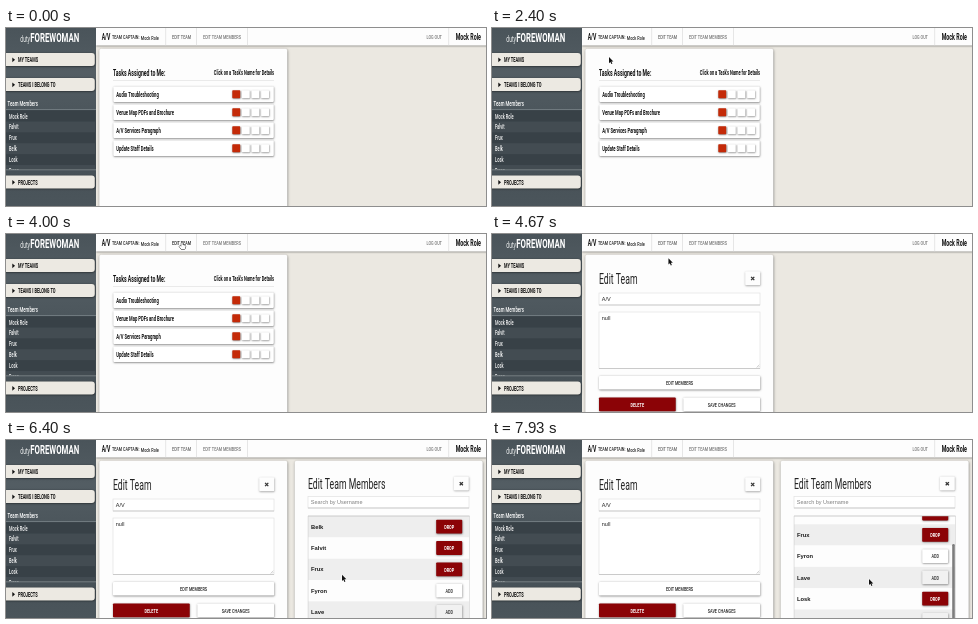
Write an HTML page with a canvas that moves like this. It is 480x178 px and loops after 8000 ms.

```html
<!DOCTYPE html>
<html lang="en">
<head>
<meta charset="utf-8">
<title>Team task board</title>
<style>
  html, body { margin: 0; width: 100%; height: 100%; overflow: hidden; background: #ebe8e1; }
  canvas { display: block; width: 480px; height: 178px; }
</style>
</head>
<body>
<canvas id="stage"></canvas>
<script>
const LOOP = 8000, W = 480, H = 178;
const CONDENSED = 0.62; // one factor for the narrow typeface
const RED = '#8b0306';
const USER = 'Mock Role';

const canvas = document.getElementById('stage');
const ctx = canvas.getContext('2d');
const ratio = Math.max(1, window.devicePixelRatio || 1);
canvas.width = W * ratio;
canvas.height = H * ratio;

function rect(x, y, w, h, color) {
  ctx.fillStyle = color;
  ctx.fillRect(x, y, w, h);
}

function vertical(y0, y1, ...colors) {
  const g = ctx.createLinearGradient(0, y0, 0, y1);
  colors.forEach((c, i) => g.addColorStop(i / (colors.length - 1), c));
  return g;
}

function raised(x, y, w, h, color = '#fff', radius = 1, blur = 2, shade = 0.5) {
  ctx.save();
  ctx.shadowColor = `rgba(0,0,0,${shade})`;
  ctx.shadowBlur = blur * ratio;
  ctx.shadowOffsetX = 0.3 * ratio;
  ctx.shadowOffsetY = 0.6 * ratio;
  ctx.fillStyle = color;
  ctx.beginPath();
  ctx.roundRect(x, y, w, h, radius);
  ctx.fill();
  ctx.restore();
}

// Form field: faint frame with a firmer lower edge.
function field(x, y, w, h) {
  rect(x, y, w, h, '#fff');
  ctx.strokeStyle = '#dedede';
  ctx.lineWidth = 0.6;
  ctx.strokeRect(x, y, w, h);
  rect(x, y + h - 0.4, w, 0.8, '#c2c2c2');
}

// Text is placed by the middle of its capitals.
function narrow(text, x, y, size, color = '#222', weight = 500, align = 'left') {
  ctx.save();
  ctx.translate(x, y + size * 0.36);
  ctx.scale(CONDENSED, 1);
  ctx.font = `${weight} ${size}px Roboto, sans-serif`;
  ctx.textAlign = align;
  ctx.fillStyle = color;
  ctx.fillText(text, 0, 0);
  ctx.restore();
}

function plain(text, x, y, size, color = '#222', weight = 400) {
  ctx.font = `${weight} ${size}px "Liberation Sans", Arial, sans-serif`;
  ctx.textAlign = 'left';
  ctx.fillStyle = color;
  ctx.fillText(text, x, y + size * 0.36);
}

function clipped(x, y, w, h, draw) {
  ctx.save();
  ctx.beginPath();
  ctx.rect(x, y, w, h);
  ctx.clip();
  draw();
  ctx.restore();
}

function button(label, x, y, w, h, color = '#fff', hover = false) {
  const red = color === RED;
  raised(x, y, w, h, color, 0.8, 2, hover ? 0.8 : 0.5);
  narrow(label, x + w / 2, y + h / 2, 6.2, red ? '#fff' : '#222', red ? 700 : 500, 'center');
}

function closeButton(x, y) {
  raised(x, y, 15, 14, '#fdfdfd', 1, 2, 0.4);
  const cx = x + 7.5, cy = y + 7.2, r = 1.6;
  ctx.strokeStyle = '#333';
  ctx.lineWidth = 1.3;
  ctx.beginPath();
  ctx.moveTo(cx - r, cy - r); ctx.lineTo(cx + r, cy + r);
  ctx.moveTo(cx + r, cy - r); ctx.lineTo(cx - r, cy + r);
  ctx.stroke();
}

function sidebarTab(label, y) {
  raised(-3, y, 91.8, 13, '#ece9e2', 3, 2, 0.6);
  ctx.fillStyle = '#111';
  ctx.beginPath();
  ctx.moveTo(6.3, y + 4.4); ctx.lineTo(9, y + 6.8); ctx.lineTo(6.3, y + 9.2);
  ctx.fill();
  narrow(label, 12, y + 6.9, 6.4, '#111', 600);
}

function sidebar() {
  rect(0, 0, 90, H, vertical(0, H, '#4a545a', '#535d63', '#4b555b', '#465056', '#4b555b'));
  narrow('duty', 24, 11, 8.2, '#eceeee', 400, 'right');
  narrow('FOREWOMAN', 24.3, 9.6, 12.6, '#fff', 600);
  sidebarTab('MY TEAMS', 25);
  sidebarTab('TEAMS I BELONG TO', 50);
  narrow('Team Members', 1.5, 75.3, 7, '#fff');
  rect(0, 81.4, 90, 0.7, '#879095');
  clipped(0, 82, 90, 59.5, () => {
    rect(0, 82, 90, 60, '#3d464c');
    [USER, 'Falvit', 'Frux', 'Belk', 'Losk', 'Fyron'].forEach((name, i) => {
      const y = 88.2 + i * 10.85;
      rect(0, y - 5.4, 89, 10.85, i % 2 ? '#434c52' : '#384147');
      narrow(name, 3, y, 6.4, '#f6f6f6');
    });
  });
  rect(0, 141.5, 90, 0.7, '#8a9194');
  sidebarTab('PROJECTS', 147.5);
}

function topBar(hoverEdit) {
  raised(90, -3, 393, 20.6, '#fdfdfd', 0, 2, 0.5);
  narrow('A/V', 95.7, 9, 8.2, '#111', 700);
  narrow('TEAM CAPTAIN:', 106, 9.3, 6, '#222');
  narrow(USER, 134.8, 9.3, 6.2, '#222');
  narrow('EDIT TEAM', 166, 9, 6.1, hoverEdit ? '#222' : '#666');
  narrow('EDIT TEAM MEMBERS', 197, 9, 6.1, '#777');
  narrow('LOG OUT', 420.5, 9, 6.1, '#777');
  narrow(USER, 475, 9, 8.6, '#111', 700, 'right');
  for (const x of [159.5, 190, 241, 442.5]) rect(x, 0, 0.6, 17.5, '#d8d8d8');
}

function panel(x) {
  raised(x, 20.8, 188, 170, '#fdfdfd', 2, 2.5, 0.5);
}

function taskList() {
  narrow('Tasks Assigned to Me:', 107, 44.8, 8.3, '#111', 600);
  narrow("Click on a Task's Name for Details", 268, 45, 6.4, '#111', 600, 'right');
  rect(107, 52, 161, 0.5, '#d6d6d6');
  ['Audio Troubleshooting', 'Venue Map PDFs and Brochure', 'A/V Services Paragraph', 'Update Staff Details']
    .forEach((task, i) => {
      const y = 66.5 + i * 18;
      raised(107.3, y - 8, 160.5, 15.6);
      narrow(task, 110.3, y + 0.4, 6.7, '#111', 600);
      for (let k = 0; k < 4; k++) {
        raised(226.3 + k * 9.6, y - 4.2, 7.9, 7.9, k ? '#fff' : '#c42a08', 0.6, 1.8, 0.55);
      }
    });
}

function editTeam(hoverMembers) {
  narrow('Edit Team', 107, 45, 14, '#222', 400);
  closeButton(253.2, 37.3);
  field(107, 59, 161, 12);
  plain('A/V', 109.8, 65, 5.5);
  field(107, 78, 161, 56.5);
  plain('null', 109.8, 84.2, 5.5);
  ctx.strokeStyle = '#999';
  ctx.lineWidth = 0.4;
  ctx.beginPath();
  ctx.moveTo(264.5, 133.5); ctx.lineTo(267.3, 130.7);
  ctx.moveTo(266, 133.5); ctx.lineTo(267.3, 132.2);
  ctx.stroke();
  button('EDIT MEMBERS', 107, 142, 161.2, 13.6, '#fff', hoverMembers);
  button('DELETE', 107, 163.4, 76.7, 13.8, RED);
  button('SAVE CHANGES', 191.3, 163.4, 76.7, 13.8);
}

function editMembers(scroll, scrolling) {
  panel(288.7);
  narrow('Edit Team Members', 302, 44, 14, '#222', 400);
  closeButton(447.8, 36.5);
  field(302, 56.6, 161, 11.4);
  plain('Search by Username', 304.8, 62.2, 5.5, '#808080');
  clipped(302, 76, 161.5, 102, () => {
    [['Belk', 1], ['Falvit', 1], ['Frux', 1], ['Fyron', 0], ['Lave', 0], ['Losk', 1], [USER, 0]]
      .forEach(([name, member], i) => {
        const y = 86.8 + i * 21.3 - scroll;
        rect(302, y - 10.65, 161.3, 21.3, i % 2 ? '#fdfdfd' : '#eeeeee');
        plain(name, 305, y, 5.8, '#1c1c1c', 700);
        button(member ? 'DROP' : 'ADD', 430.2, y - 7, 26, 13.8, member ? RED : i % 2 ? '#fff' : '#f1f1f1');
      });
    if (scrolling) {
      ctx.fillStyle = '#7d7d7d';
      ctx.beginPath();
      ctx.roundRect(460.2, 77 + scroll * 0.78, 2.6, 90, 1.3);
      ctx.fill();
    }
  });
  rect(302, 75.7, 161.5, 0.6, '#aaa');
  rect(301.8, 76, 0.5, 102, '#c8c8c8');
  rect(463.2, 76, 0.5, 102, '#c8c8c8');
}

// Pointer stops: time, x, y
const stops = [
  [500, 62, 50], [1070, 69, 39], [1800, 100, 33], [2130, 117, 29], [2500, 117, 29],
  [3700, 176, 8.5], [4500, 176, 8.5], [5330, 180, 152.3], [5900, 180, 152.3],
  [6400, 336, 134.8], [6550, 336, 134.8], [7150, 377, 138.9], [LOOP, 377, 138.9]
];

function ease(p) {
  p = Math.min(1, Math.max(0, p));
  return p * p * (3 - 2 * p);
}

function pointerAt(t) {
  const i = stops.findIndex(s => s[0] > t);
  const [t0, x0, y0] = stops[i - 1], [t1, x1, y1] = stops[i];
  const p = ease((t - t0) / (t1 - t0));
  return [x0 + (x1 - x0) * p, y0 + (y1 - y0) * p];
}

const ARROW = new Path2D('M0 0V6.2L1.4 4.9L2.4 7.1L3.4 6.7L2.4 4.5H4.4Z');
const HAND = new Path2D('M-.7 .4Q0-.5 .7 .4V2.4L3.2 3Q3.8 3.3 3.6 4.2L2.8 6.6H-.9L-2.7 3.9Q-2.4 3-1.5 3.5L-.7 4.2Z');

function pointer(t) {
  const [x, y] = pointerAt(t);
  const overEdit = x > 164 && x < 187 && y < 14;
  const overMembers = t > 5000 && x > 107 && x < 268 && y > 142;
  const hand = overEdit || overMembers;
  ctx.save();
  ctx.translate(x, y);
  ctx.lineWidth = 0.9;
  ctx.strokeStyle = hand ? '#111' : '#fff';
  ctx.fillStyle = hand ? '#fff' : '#111';
  ctx.stroke(hand ? HAND : ARROW);
  ctx.fill(hand ? HAND : ARROW);
  ctx.restore();
}

function draw(t) {
  ctx.setTransform(ratio, 0, 0, ratio, 0, 0);
  rect(0, 0, W, H, '#ebe8e1');
  panel(93.3);
  if (t < 4330) taskList();
  else editTeam(t > 5200 && t < 6000);
  if (t >= 5930) editMembers(34.5 * ease((t - 7330) / 570), t >= 7330);
  topBar(t > 3600 && t < 4600);
  sidebar();
  if (t >= stops[0][0]) pointer(t);
}

function tick() {
  draw(performance.now() % LOOP);
  requestAnimationFrame(tick);
}
tick();
</script>
</body>
</html>
```
